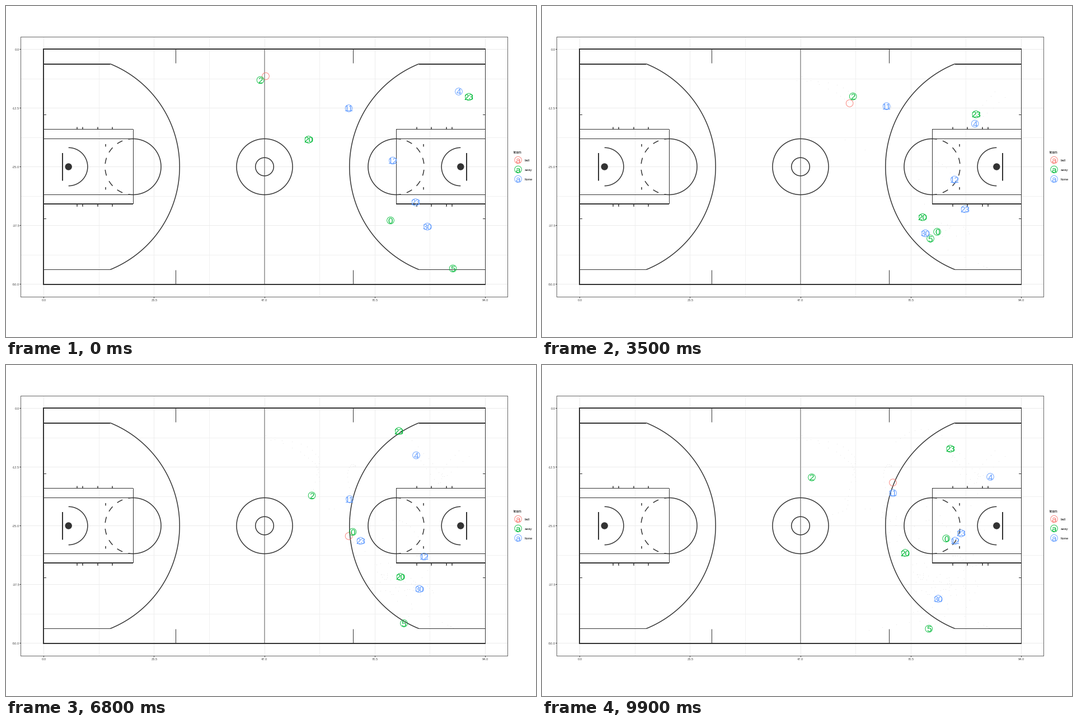
These frames come from a looping animation (947 px wide and 592 px high, 10000 ms). A matplotlib script:

```python
import numpy as np
import matplotlib.pyplot as plt
from matplotlib.animation import FuncAnimation
from matplotlib.patches import Circle

W, H, DPI = 947, 592, 100
PX = 72 / DPI
INK = "#333333"
BALL, AWAY, HOME = "#F8766D", "#00BA38", "#619CFF"
CX, CY, FOOT = 462, 287.5, 8.39

plt.rcParams["font.family"] = "Liberation Sans"
fig = plt.figure(figsize=(W / DPI, H / DPI), dpi=DPI, facecolor="white")
ax = fig.add_axes([0, 0, 1, 1])
ax.set_xlim(0, W)
ax.set_ylim(H, 0)
ax.axis("off")


def line(xs, ys, w=1, color=INK, z=2):
    ax.plot(xs, ys, color=color, lw=w * PX, zorder=z, solid_capstyle="butt", snap=False)


def grid_fit(v, w):
    """Centre thin lines on a pixel, thicker ones on a pixel edge."""
    return np.floor(v) + 0.5 if w == 1 else np.round(v)


def hline(y, x0, x1, w=1, **kw):
    y = grid_fit(y, w)
    line([x0, x1], [y, y], w, **kw)


def vline(x, y0, y1, w=1, **kw):
    x = grid_fit(x, w)
    line([x, x], [y0, y1], w, **kw)


def arc(cx, r, a0, a1, w=1.5):
    """Arc on the long axis of the court, angles in degrees from +x."""
    a = np.radians(np.linspace(a0, a1, 90))
    line(cx + r * np.cos(a), CY + r * np.sin(a), w)


def label(x, y, s, px, color="black", ha="left", va="center_baseline", z=3):
    return ax.text(x, y, s, fontsize=px * PX, color=color, ha=ha, va=va, zorder=z)


def tag(x, y, s, color):
    return label(x, y + 5.5, s, 15.3, color, "center", "baseline", 6)


# ---- panel, grid and axes
for i, (x, y) in enumerate(zip(np.linspace(67.5, 856.5, 9), np.linspace(77.8, 497.5, 9))):
    tone = "#F0F0F0" if i % 2 else "#EBEBEB"
    vline(x, 55, 520, color=tone, z=0)
    hline(y, 27, 897, color=tone, z=0)
    if i % 2 == 0:
        vline(x, 520, 522.5)
        hline(y, 24.5, 27)
        label(x, 525.6, f"{94 * i / 8:.1f}", 5.8, "#4D4D4D", "center")
        label(24.2, y + 0.3, f"{-50 * i / 8 + 0.0:.1f}", 5.8, "#4D4D4D", "right")
for y in (55, 520):
    hline(y, 26, 897, color="#666666", z=1)
for x in (26, 896):
    vline(x, 55, 521, color="#666666", z=1)

# ---- court
for y in (77, 498):
    hline(y, 66, 857, 2)
vline(67, 76, 499, 2)
vline(856, 76, 499)
vline(CX, 78, 497, 2, color="#A8A8A8")
arc(CX, 6 * FOOT - 0.3, 0, 360)
arc(CX, 2 * FOOT - 0.5, 0, 360)
for x in (303, 620):
    vline(x, 78, 102.5)
    vline(x, 472.5, 497)


def half(side):
    """One end of the court; side is -1 for left and 1 for right."""
    def X(d):
        return CX + side * d

    def turn(a):
        return a if side < 0 else 180 - a

    base, hoop, foul = X(395), X(350.3), X(235)
    hline(103.5, base, X(276), 2)
    hline(471.5, base, X(276))
    end = np.degrees(np.arcsin(184 / 198.5))
    arc(hoop, 198.5, turn(-end), turn(end))

    # Lane and foul circle; its far half is cut into 13 equal gaps and dashes.
    hline(220.5, base, foul)
    hline(354, base, foul, 2)
    for y in (237.5, 337.5):
        hline(y, base, foul)
    vline(foul, 220.5, 354)
    over = 9.8
    arc(foul, 50, turn(-90 - over), turn(90 + over))
    cuts = np.linspace(90 + over, 270 - over, 14)
    for a0, a1 in zip(cuts[1:-1:2], cuts[2::2]):
        arc(foul, 50, turn(a0), turn(a1))

    arc(hoop, 4 * FOOT + 0.6, turn(-90), turn(90))
    ax.add_patch(Circle((hoop, CY), 6.2, fc=INK, ec="none", zorder=2))
    vline(X(361.3), 263, 312.5, 2)

    for d in (335, 325, 298.5, 272):
        vline(X(d), 216.5, 220.5, 1.5)
        vline(X(d), 355, 358.8, 1.5)
    for y in (247, 324):
        vline(X(284.3), y, y + 4.5, 1.5)
    for y in (194, 380):
        hline(y, base, X(390))


half(-1)
half(1)

# ---- legend
label(907, 261.5, "team", 6.7)
for y, name, color in ((275.5, "ball", BALL), (292.3, "away", AWAY), (309.5, "home", HOME)):
    ax.add_patch(Circle((915, y), 6.2, fill=False, ec=color, lw=0.85 * PX, zorder=5))
    tag(915, y, "a", color)
    label(927, y + 1, name, 5.8)

# ---- motion: a smooth run through a few points per player
STEPS = 24
KEYS = [0, 4, 7.5, 11.5, 16, 19, 23]


def smooth(t, k, v):
    """Cubic curve through the values v at times k."""
    m = np.gradient(v, k)
    i = np.clip(np.searchsorted(k, t, "right") - 1, 0, len(k) - 2)
    h = k[i + 1] - k[i]
    u = (t - k[i]) / h
    return ((1 + 2 * u) * (1 - u) ** 2 * v[i] + u * (1 - u) ** 2 * h * m[i]
            + u * u * (3 - 2 * u) * v[i + 1] + u * u * (u - 1) * h * m[i + 1])


def run(*points, at=KEYS, curve=smooth):
    t, k = np.arange(STEPS), np.array(at, float)
    path = np.column_stack([curve(t, k, np.array(v, float)) for v in zip(*points)])
    return np.vstack([path, path[:1]])


players = [
    # dribbled, passed twice, shot at the hoop, rebounded
    ("", BALL, run((464, 125.5), (526, 155), (551, 174.5), (558, 188.5), (560, 208),
                   (612.5, 306), (632, 286), (686.5, 440.5), (812, 288), (790, 295),
                   at=[0, 4, 7.5, 11.5, 14, 16, 18, 19, 22, 23], curve=np.interp)),
    ("2", AWAY, run((454.5, 132.5), (526.5, 140.5), (556, 162), (558.5, 180),
                    (546.5, 233.5), (543.5, 256.5), (509.5, 269.5))),
    ("23", AWAY, run((827, 162.5), (787.5, 197), (775.5, 194), (750.5, 162.5),
                     (702, 118), (666, 117), (631.5, 137))),
    ("20", AWAY, run((540.5, 239), (673, 310), (680, 379), (670, 374),
                     (704.5, 379), (773.5, 386), (757.5, 433))),
    ("0", AWAY, run((687, 383.5), (729.5, 393.5), (706.5, 404), (648, 393.5),
                    (619.5, 298.5), (632.5, 270.5), (757.5, 237))),
    ("5", AWAY, run((798.5, 469.5), (778.5, 460), (691.5, 416), (726.5, 382),
                    (711, 462), (675, 457.5), (584, 474))),
    ("11", HOME, run((612.5, 183), (624, 180), (615.5, 179), (610, 196.5),
                     (614, 240), (607, 271.5), (642, 275))),
    ("4", HOME, run((809, 153), (782, 184.5), (774, 211.5), (748.5, 181.5),
                    (733, 161.5), (737, 182), (793, 247))),
    ("12", HOME, run((691, 276.5), (714.5, 283), (737.5, 310.5), (732, 339),
                     (747, 342.5), (764, 359), (785, 352))),
    ("23", HOME, run((731.5, 351), (754, 350.5), (756, 362.5), (710, 400.5),
                     (633.5, 314.5), (665, 287.5), (766, 251))),
    ("30", HOME, run((753, 394.5), (757, 409), (684, 407.5), (664, 354.5),
                     (738.5, 400.5), (697, 432.5), (663, 441.5))),
]
paths = np.stack([path for _, _, path in players], axis=1)

trail = ax.scatter([], [], s=PX ** 2, marker="s", c="#E6E6E6", lw=0, zorder=1)
rings = ax.scatter(*paths[0].T, s=(12.6 * PX) ** 2, facecolors="none",
                   edgecolors=[c for _, c, _ in players], linewidths=0.85 * PX, zorder=5)
tags = [tag(0, 0, n, c) for n, c, _ in players]

# Frame at which each step is reached; it is held, then left in 2 or 3 moves.
REACHED = np.array([0, *range(4, 20, 5), *range(24, 101, 4)])


def update(frame):
    k = np.searchsorted(REACHED, frame, "right") - 1
    moves = 3 if k < 5 else 2
    u = max(0.0, (frame - REACHED[k + 1] + moves) / moves)
    pos = paths[k] + (paths[k + 1] - paths[k]) * u
    rings.set_offsets(pos)
    for text, (x, y) in zip(tags, pos):
        text.set_position((x, y + 5.5))
    trail.set_offsets(paths[:k + (u > 0)].reshape(-1, 2))
    return [rings, trail, *tags]


anim = FuncAnimation(fig, update, frames=100, interval=100, repeat=True, repeat_delay=0)
plt.show()
```
